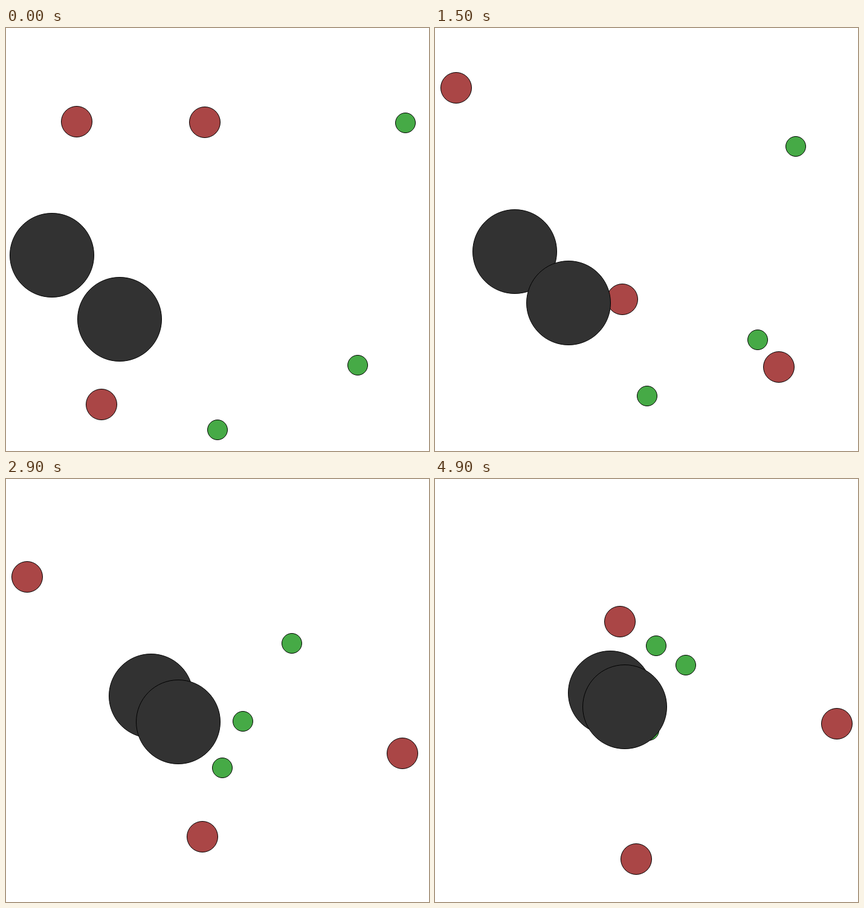
An HTML page with a canvas for the animation above (5000 ms loop, 700x700 px).

```html
<!DOCTYPE html>
<html lang="en">
<head>
<meta charset="utf-8">
<title>Zooming circles</title>
<style>
  html, body { margin: 0; width: 100%; height: 100%; overflow: hidden; background: #fff; }
  canvas { display: block; }
</style>
</head>
<body>
<canvas id="stage" width="700" height="700"></canvas>
<script>
const ctx = document.getElementById('stage').getContext('2d');
const LOOP = 5000, STEP = 100, MID = 349, CRUISE = 35.4, LAG = 1.8;

const BLACK = { fill: '#323232', r: 69.5 };
const RED = { fill: '#aa4646', r: 25.5 };
const GREEN = { fill: '#46aa46', r: 16.5 };

function ease(n, from, to) {
  const u = Math.min(1, Math.max(0, (n - from) / (to - from)));
  return u * u * (3 - 2 * u);
}

// Distance covered from rest, settling to cruising speed.
const travel = n => CRUISE * (n - LAG * (1 - Math.exp(-n / LAG)));

const still = (x, y) => () => [x, y];

// Smooth path through [tick, x, y] turning points: rests before, drifts on after.
function roam(drift, ...pts) {
  const last = pts.length - 1;
  const slope = (i, k) => {
    if (i === 0) return 0;
    if (i === last) return drift[k - 1];
    const rate = j => (pts[j + 1][k] - pts[j][k]) / (pts[j + 1][0] - pts[j][0]);
    const a = rate(i - 1), b = rate(i);
    return a * b > 0 ? 2 * a * b / (a + b) : 0;
  };
  const at = (n, k) => {
    if (n <= pts[0][0]) return pts[0][k];
    if (n >= pts[last][0]) return pts[last][k] + drift[k - 1] * (n - pts[last][0]);
    const i = pts.findIndex(p => p[0] > n) - 1;
    const a = pts[i], b = pts[i + 1], h = b[0] - a[0];
    const u = (n - a[0]) / h, v = 1 - u;
    return v * v * (1 + 2 * u) * a[k] + u * u * (1 + 2 * v) * b[k]
      + h * u * v * (v * slope(i, k) - u * slope(i + 1, k));
  };
  return n => [at(n, 1), at(n, 2)];
}

// Nudged twice by passing reds, then drifts back slowly.
const nudged = n => [
  1.5 + 1.2 * ease(n, 6, 14) + 21.5 * ease(n, 16, 23),
  316.6 + 10.3 * ease(n, 6, 14) - 0.4 * Math.max(0, n - 23)
];

const runner = n => [travel(n) - 190.6, 265 + 9.3 * Math.exp(-n / 10)];

const bodies = [
  [GREEN, still(312.3, -191.3)],
  [GREEN, roam([20, -12], [15, 233.02, 209.9], [23, 152, 189], [34, 70.5, 46.5],
    [42, -25, -255], [49, 82, -339])],
  [GREEN, nudged],
  [RED, roam([35, -0.8], [0, -231.5, -193.5], [6, -143, -247], [11, -254.7, -301.7],
    [15, -394, -313.6], [23, -648, -354.5], [30, -792, -482], [36, -655.7, -517])],
  [RED, roam([0, 35], [0, -19.5, -192.5], [6, -143, -109], [11, -119, 26],
    [15, -48.4, 126], [23, -38.2, 402], [34, -73.5, 787])],
  [RED, runner],
  [BLACK, still(-272.3, 27.5)],
  [BLACK, still(-160.6, 133.5)]
];

// The view zooms out so that every body stays inside.
const zoomFor = points => Math.min(1, ...points.flat().map(c =>
  (c > 0 ? 316.6 : 313.5) / Math.abs(c)));

function disc({ fill, r }, x, y) {
  ctx.beginPath();
  ctx.arc(x, y, r, 0, Math.PI * 2);
  ctx.fillStyle = fill;
  ctx.fill();
  ctx.stroke();
}

function draw(tick) {
  const points = bodies.map(([, move]) => move(tick));
  const zoom = zoomFor(points);
  ctx.fillStyle = '#fff';
  ctx.fillRect(0, 0, 700, 700);
  ctx.strokeStyle = '#000';
  bodies.forEach(([kind], i) => {
    const [x, y] = points[i].map(c => Math.floor(MID + c * zoom));
    disc(kind, x, y);
  });
}

const start = performance.now();
function frame() {
  const t = Math.max(0, performance.now() - start) % LOOP;
  draw(Math.floor(t / STEP));
  requestAnimationFrame(frame);
}
frame();
</script>
</body>
</html>
```
